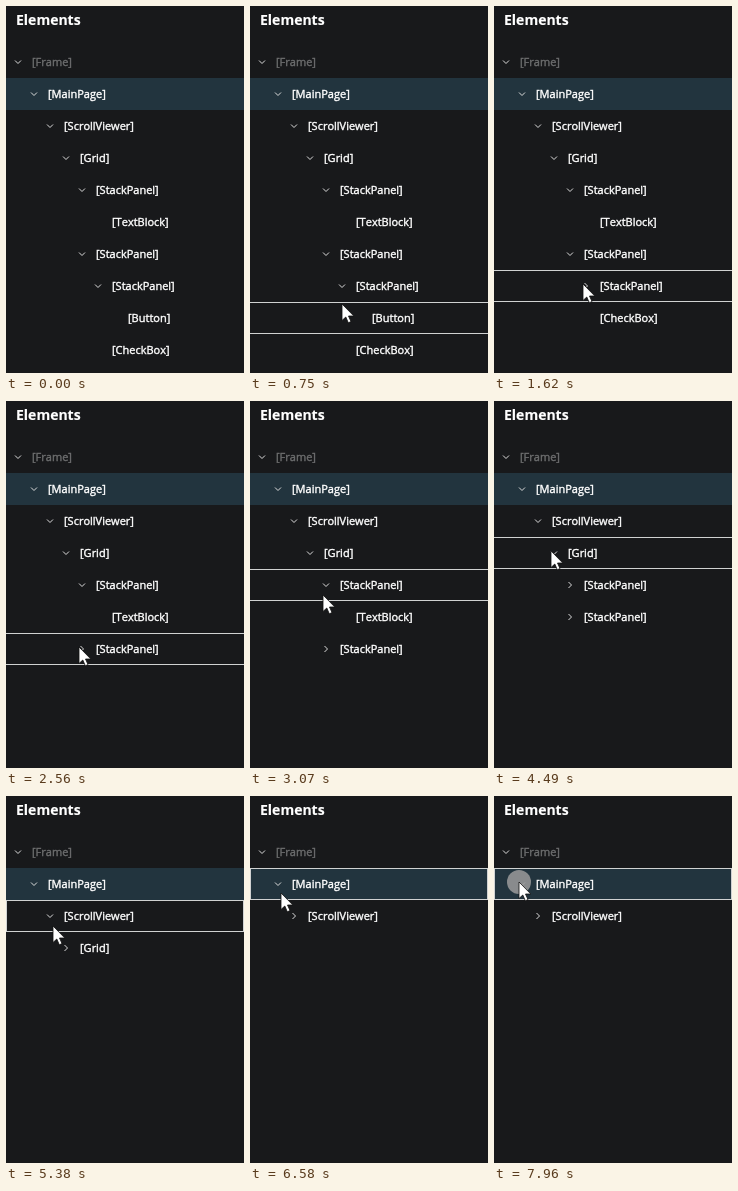
Animation of 238 by 367 pixels, one loop 8 s. Source, as an HTML page with a canvas:

```html
<!DOCTYPE html>
<html lang="en">
<head>
<meta charset="utf-8">
<title>Element tree</title>
<style>
  html, body { margin: 0; height: 100%; overflow: hidden; background: #18191b; }
  canvas { display: block; }
</style>
</head>
<body>
<canvas id="stage" width="238" height="367"></canvas>
<script>
const ctx = document.getElementById('stage').getContext('2d');
const LOOP = 8000, W = 238, H = 367, TOP = 40, ROW = 32, INDENT = 16;
const HOLD = 130, TOGGLE = 90, REOPEN = LOOP - 40;

const outline = `
Frame
 MainPage
  ScrollViewer
   Grid
    StackPanel
     TextBlock
    StackPanel
     StackPanel
      Button
     CheckBox`;

const tree = outline.trim().split('\n').map(line => {
  const label = line.trim();
  return { label, depth: line.length - label.length, closeAt: Infinity };
});
tree.forEach((node, i) => {
  node.isParent = tree[i + 1]?.depth > node.depth;
  node.x = 12 + INDENT * node.depth;
  node.y = TOP + ROW * (i + 0.5);
});

// The pointer visits the parents from the bottom up: leave, arrive, press
const parents = tree.filter(node => node.isParent).reverse();
const visits = [
  [520, 1010, 1290],
  [1620, 1820, 2200],
  [2560, 3450, 3620],
  [4120, 4480, 4540],
  [5240, 5600, 5640],
  [6370, 6890, 7750],
].map(([leave, arrive, press], i) => {
  const node = parents[i];
  node.closeAt = press + TOGGLE;
  return { leave, arrive, press, x: node.x - 3, y: node.y - 2 };
});

const easeOut = p => 1 - (1 - p) ** 2;

function pointerAt(t) {
  let x = 98, y = 349;
  for (const v of visits) {
    if (t < v.leave) break;
    const p = easeOut(Math.min(1, (t - v.leave) / (v.arrive - v.leave)));
    x += (v.x - x) * p;
    y += (v.y - y) * p;
  }
  return [Math.round(x), Math.round(y)];
}

function visibleRows(t) {
  const rows = [];
  let hiddenBelow = Infinity;
  for (const node of tree) {
    if (node.depth > hiddenBelow) continue;
    const closed = t >= node.closeAt && !(node.depth === 1 && t >= REOPEN);
    hiddenBelow = closed ? node.depth : Infinity;
    rows.push({ ...node, closed });
  }
  return rows;
}

// A hairline stroke gives the text its heavier weight
function text(str, x, y, font, color, weight) {
  ctx.font = font + ' "Open Sans", sans-serif';
  ctx.fontKerning = 'none';
  ctx.fillStyle = ctx.strokeStyle = color;
  ctx.lineWidth = weight;
  ctx.fillText(str, x, y);
  ctx.strokeText(str, x, y);
}

function chevron(x, y, closed) {
  ctx.save();
  ctx.translate(x, y);
  if (closed) ctx.rotate(-Math.PI / 2);
  ctx.strokeStyle = '#dcdcdc';
  ctx.lineWidth = 1;
  ctx.beginPath();
  ctx.moveTo(-3, -1.5);
  ctx.lineTo(0, 1.5);
  ctx.lineTo(3, -1.5);
  ctx.stroke();
  ctx.restore();
}

function hoverBox(y, withSides) {
  ctx.strokeStyle = '#d0d2d2';
  ctx.lineWidth = 1;
  const overhang = withSides ? 0 : 2;
  ctx.strokeRect(0.5 - overhang, y + 0.5, W - 1 + 2 * overhang, ROW - 1);
}

const arrow = new Path2D('M0 0V16.5L3.8 13L6.3 18.8L9 17.6L6.5 12H11.8Z');

function drawPointer(x, y, pressed) {
  if (pressed) {
    ctx.fillStyle = 'rgba(155,155,155,.85)';
    ctx.beginPath();
    ctx.arc(x, y, 12, 0, 2 * Math.PI);
    ctx.fill();
  }
  ctx.save();
  ctx.translate(x, y);
  ctx.fillStyle = '#fff';
  ctx.fill(arrow);
  ctx.strokeStyle = '#111';
  ctx.lineWidth = 0.8;
  ctx.stroke(arrow);
  ctx.restore();
}

function draw(t) {
  ctx.fillStyle = '#18191b';
  ctx.fillRect(0, 0, W, H);
  text('Elements', 10, 19, 'bold 14px', '#fff', 0.15);

  const [px, py] = pointerAt(t);
  const shown = t >= visits[0].leave;
  const hovered = shown ? Math.floor((py - TOP) / ROW) : -1;

  visibleRows(t).forEach(({ label, x, isParent, closed }, i) => {
    const y = TOP + i * ROW, mid = y + ROW / 2;
    if (i === 1) {
      ctx.fillStyle = '#22343e';
      ctx.fillRect(0, y, W, ROW);
    }
    if (i === hovered) hoverBox(y, i < 3);
    if (isParent) chevron(x, mid, closed);
    text(`[${label}]`, x + 14, mid + 4, '11px', i ? '#fff' : '#6c6d6e', 0.4);
  });

  const pressed = t >= REOPEN || visits.some(v => t >= v.press && t < v.press + HOLD);
  if (shown) drawPointer(px, py, pressed);
}

const began = performance.now();
function tick() {
  draw((performance.now() - began) % LOOP);
  requestAnimationFrame(tick);
}
tick();
</script>
</body>
</html>
```
